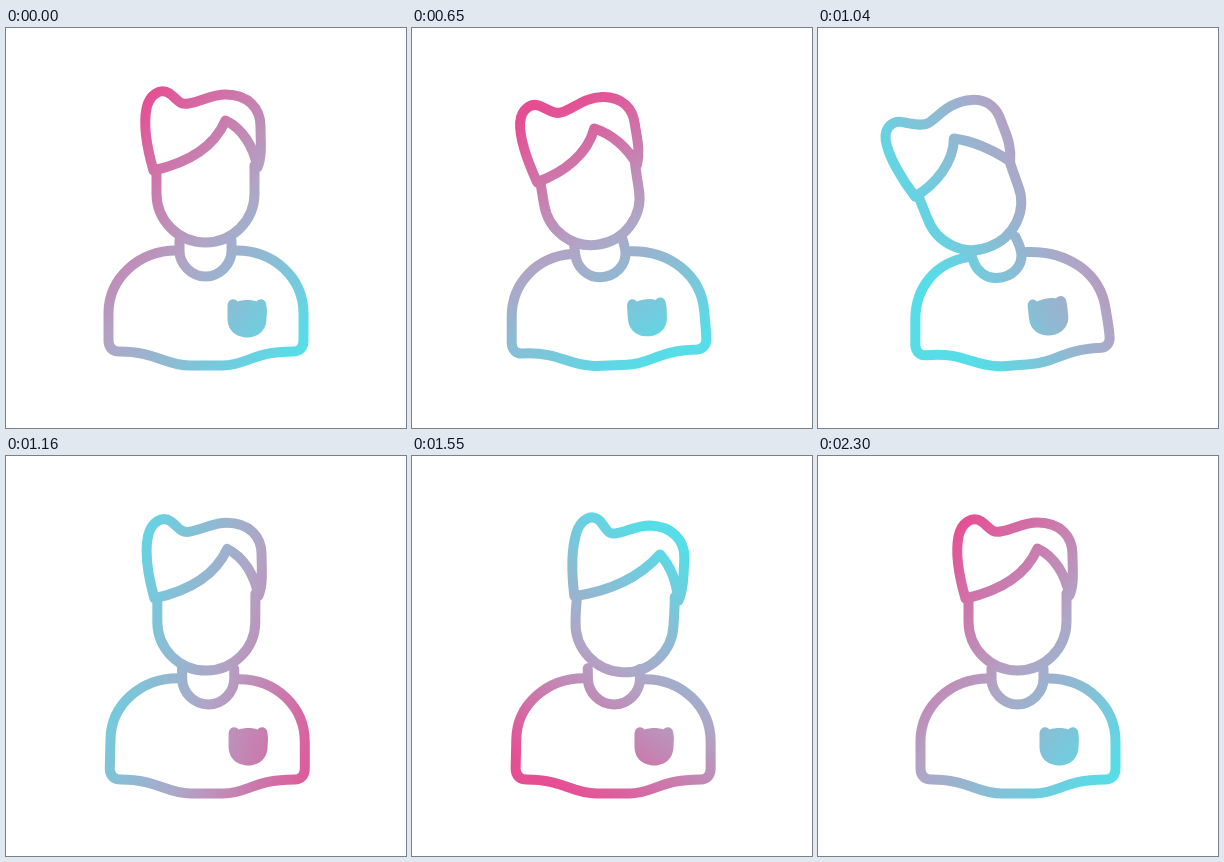
Recreate the animation shown at these times as an HTML page. Size 400 by 400 pixels, loop 2.33 s.

```html
<!DOCTYPE html>
<html lang="en">
<head>
<meta charset="utf-8">
<title>Leaning figure</title>
<style>
  html, body { margin: 0; width: 100%; height: 100%; overflow: hidden; background: #fff; }
  svg { display: block; width: 100%; height: 100%; }
  path { fill: none; stroke: url(#paint); stroke-width: 10; stroke-linecap: round; stroke-linejoin: round; }
  #badge { fill: url(#paint); stroke: none; }
</style>
</head>
<body>
<svg viewBox="-.5 -.5 400 400">
  <linearGradient id="paint" gradientUnits="userSpaceOnUse">
    <stop offset="0" stop-color="#e64e93"/>
    <stop offset=".5" stop-color="#b0a5c6"/>
    <stop offset="1" stop-color="#56dde8"/>
  </linearGradient>
  <path id="body"/>
  <path id="neck"/>
  <path id="face"/>
  <path id="hair"/>
  <path id="badge"/>
</svg>
<script>
const LOOP = 2330, STEP = 30, PHASE = 20;

// Each part: upright, leaning left, leaning right
const poses = {
  hair: [
    'M147 142C140 118 137 95 140 80C143 66 154 59 163 65C170 70 173 77 182 75C195 73 205 66 219 66C242 66 254 80 254 98C254 112 256 128 251 139C247 118 236 100 219 92C207 120 178 135 147 142Z',
    'M91 171C78 156 62 132 59 115C57 102 66 95 76 97C86 98 96 101 103 96C112 89 124 73 146 72C163 71 171 82 175 93C180 105 186 115 185 132C168 123 146 114 126 112C127 135 111 158 91 171Z',
    'M172 138C172 115 174 92 180 75C185 60 198 54 205 65C210 73 210 80 219 78C228 76 238 71 250 71C272 72 285 87 284 104C283 122 281 138 276 148C276 130 272 115 267 102C240 122 208 135 172 138Z'
  ],
  face: [
    'M150 143C150 150 150 158 150 165C150 192 172 214 199 214C226 214 248 192 248 165C248 156 248 147 248 137',
    'M95 172C98 179 101 186 104 192C114 217 142 230 167 219C192 209 205 181 194 156C191 148 187 139 184 130',
    'M174 143C173 150 172 158 172 165C170 192 191 215 218 217C245 219 268 198 270 171C271 162 272 152 272 143'
  ],
  neck: [
    'M173 212C173 215 173 219 173 222C173 236 185 248 199 248C213 248 225 236 225 222C225 219 225 215 225 212',
    'M145 226C146 229 146 232 148 235C153 246 163 251 171 250C187 249 197 238 195 226C194 219 190 212 187 207',
    'M187 211C187 215 188 219 188 222C188 237 200 248 214 248C229 248 240 237 240 224C240 221 240 218 240 215'
  ],
  body: [
    'M170 222C132 222 102 250 102 285C102 294 102 303 102 312C102 319 106 323 113 323C150 323 158 337 183 337C194 337 205 337 216 337C240 337 246 323 287 323C293 323 297 319 297 312C297 303 297 294 297 285C297 250 268 222 230 222',
    'M143 231C112 238 95 262 95 293C95 302 95 311 95 319C96 325 100 329 106 328C144 324 148 336 178 338C189 338 200 336 212 335C238 333 240 321 281 318C287 317 290 312 289 306C288 298 286 289 284 281C277 240 240 222 200 224',
    'M185 220C145 217 114 242 113 276C112 288 110 300 109 312C109 319 113 323 120 323C157 323 165 337 189 337C200 337 211 337 222 337C246 337 252 323 294 323C300 323 304 319 304 312C304 303 304 294 304 287C304 252 278 227 245 226'
  ],
  badge: [
    'M221 278C221 270 228 269 231 273C237 271 245 271 250 273C253 269 260 270 260 278C261 282 260 286 260 290C260 303 250 309 241 309C231 309 221 303 221 290C221 286 221 282 221 278Z',
    'M205 279C204 271 211 269 214 273C220 270 228 268 233 269C236 265 243 265 244 273C245 277 245 281 246 285C248 297 239 305 230 306C220 308 209 303 207 291C206 287 206 283 205 279Z',
    'M227 278C227 270 234 269 237 273C243 271 251 271 256 273C259 269 266 270 266 278C267 282 266 286 266 290C266 303 256 309 247 309C237 309 227 303 227 290C227 286 227 282 227 278Z'
  ]
};

// [time, lean]: -1 is left, 1 is right
const headLean = [[500, 0], [857, -1.065], [975, -1.065], [1330, 1], [1850, -.07], [2130, .15], [2300, 0]];
const bodyLean = [[500, 0], [857, -1.065], [938, -1.065], [1330, 1], [1620, .03], [1800, 0]];

// [time, angle towards pink, centre x, centre y, half length]
const gradientKeys = [
  [500, -137, 213, 196, 143],
  [800, -97, 205, 196, 128],
  [1040, -28, 230, 185, 135],
  [1310, 75, 203, 211, 138],
  [1850, 186, 194, 202, 126],
  [2300, 223, 213, 196, 143]
];

const $ = id => document.getElementById(id);
const mix = (a, b, u) => a + (b - a) * u;
const linear = u => u;
const sine = u => (1 - Math.cos(Math.PI * u)) / 2;

function sample(keys, t, ease) {
  const last = keys[keys.length - 1];
  if (t <= keys[0][0]) return keys[0].slice(1);
  if (t >= last[0]) return last.slice(1);
  const i = keys.findIndex(key => key[0] > t);
  const a = keys[i - 1], b = keys[i];
  const u = ease((t - a[0]) / (b[0] - a[0]));
  return a.slice(1).map((v, k) => mix(v, b[k + 1], u));
}

const numbers = path => path.match(/\d+/g).map(Number);

function setPose(id, lean) {
  const [rest, left, right] = poses[id];
  const goal = numbers(lean < 0 ? left : right);
  let i = 0;
  $(id).setAttribute('d', rest.replace(/\d+/g, n => mix(+n, goal[i++], Math.abs(lean)).toFixed(2)));
}

function setGradient(t) {
  const [angle, cx, cy, half] = sample(gradientKeys, t, linear);
  const dx = half * Math.cos(angle * Math.PI / 180);
  const dy = half * Math.sin(angle * Math.PI / 180);
  const ends = { x1: cx + dx, y1: cy + dy, x2: cx - dx, y2: cy - dy };
  for (const name in ends) $('paint').setAttribute(name, ends[name]);
}

function draw(now) {
  const t = Math.floor((now % LOOP - PHASE) / STEP) * STEP + PHASE;
  const [head] = sample(headLean, t, sine);
  const [body] = sample(bodyLean, t, sine);
  for (const id of ['hair', 'face']) setPose(id, head);
  for (const id of ['neck', 'body', 'badge']) setPose(id, body);
  setGradient(t);
}

const start = performance.now();
function tick() {
  draw(performance.now() - start);
  requestAnimationFrame(tick);
}
tick();
</script>
</body>
</html>
```
